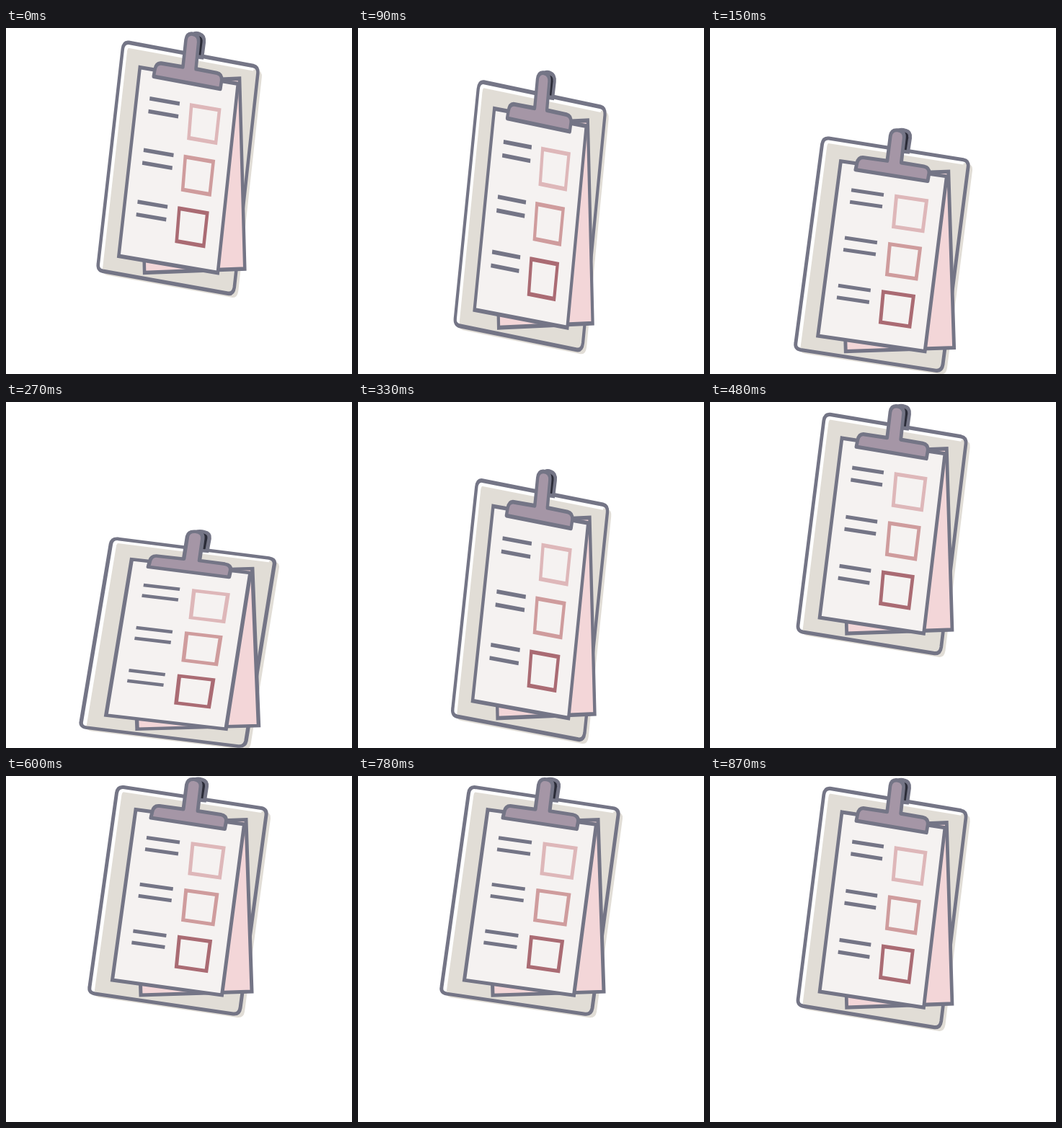
Animation of 480 by 480 pixels, one loop 900 ms. Source, as an HTML page:

```html
<!DOCTYPE html>
<html lang="en">
<head>
<meta charset="utf-8">
<title>Bouncing clipboard</title>
<style>
  html, body { margin: 0; width: 100%; height: 100%; overflow: hidden; background: #fff; }
  svg { display: block; width: 100vw; height: 100vh; }
</style>
</head>
<body>
<svg viewBox="0 0 480 480">
  <defs>
    <path id="board" d="M163 15.500 354 44.500Q362 46 361 54L325 322Q323.500 331 315 330L123 302Q114.500 300.500 116 292.500L153.500 23.500Q155 14.500 163 15.500Z"/>
    <g id="row">
      <path d="M195 85.500 241 92M193 101.500 239 108" stroke="#747586"/>
      <path d="M259 94 302 100 296.500 141 255 135Z"/>
    </g>
  </defs>
  <g id="clipboard" fill="none" stroke="#747586" stroke-width="5">
    <use href="#board" fill="#e1ddd6" stroke="none" transform="translate(6 5)"/>
    <path d="M163 17 356 46 354 51 161 22 122 304 117 300 154 25Z" fill="#fff" stroke="none"/>
    <use href="#board"/>
    <path d="M180 66 333 60.500 341 299 187 304Z" fill="#f3d6d8"/>
    <path d="M180 46.500 330.500 67 299.500 304 147.500 283Z" fill="#f5f2f1"/>

    <use href="#row" stroke="#deb7b9"/>
    <use href="#row" stroke="#cf9c9d" transform="translate(-9.300 64.700)"/>
    <use href="#row" stroke="#aa6b73" transform="translate(-18.600 129.400)"/>

    <path d="M262 5Q266 3 272 5Q279.500 7 278.500 15L275.500 34 258 32Z" fill="#2b2c38"/>
    <path d="M201 58 203 49Q205 40.500 213 41.500L246 46 250.500 12Q252 3.500 261 4.500Q271 6 270 15L266 48.500 298 53.500Q306 55 305.500 62.500L303.500 73.500Z" fill="#a596a6" stroke-linejoin="round"/>
  </g>
</svg>
<script>
const LOOP = 900, STEP = 30, IMPACT = 225;
const REST = { x: 240, y: 172 }, DROP = 173;
const clipboard = document.getElementById("clipboard");

function smoothstep(from, to, x) {
  const u = Math.min(1, Math.max(0, (x - from) / (to - from)));
  return u * u * (3 - 2 * u);
}

// The bounce is the same before and after impact, so both rules use the time away from it
const fall = d => DROP * Math.max(0, Math.cos(d / 255)) ** 4.6;
const stretch = d => 0.89 + 0.29 * smoothstep(27, 128, d) - 0.18 * smoothstep(160, 308, d);

function draw() {
  const t = Math.floor(performance.now() % LOOP / STEP) * STEP;
  const away = Math.abs(t - IMPACT);
  const d = Math.min(away, LOOP - away);
  const s = stretch(d);
  // Squash and stretch keeps the area constant
  clipboard.setAttribute("transform",
    `translate(${REST.x} ${REST.y + fall(d)}) scale(${1 / s} ${s}) translate(${-REST.x} ${-REST.y})`);
  requestAnimationFrame(draw);
}
draw();
</script>
</body>
</html>
```
